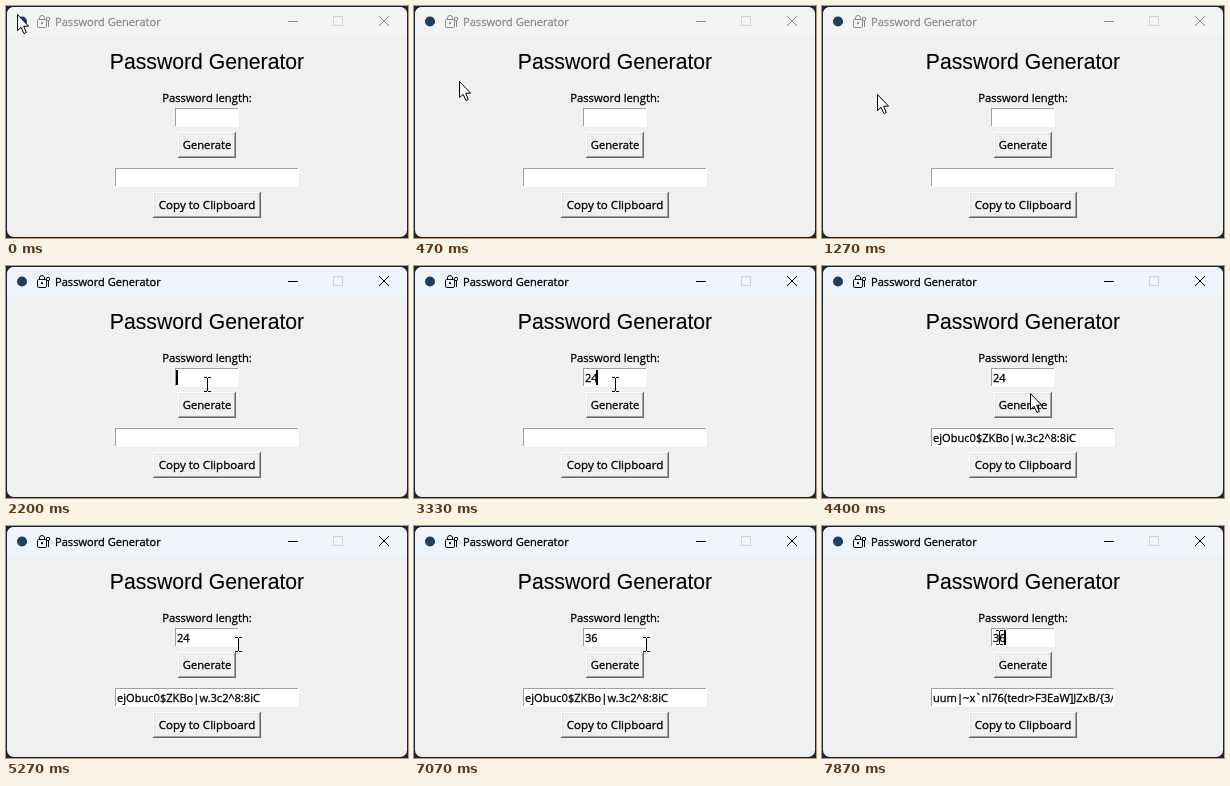
An HTML page with a canvas that plays this animation: 402x232 px, repeating every 8 s.

```html
<!DOCTYPE html>
<html lang="en">
<head>
<meta charset="utf-8">
<title>Password Generator</title>
<style>
  html, body { margin: 0; width: 100%; height: 100%; overflow: hidden; background: #141821; }
  canvas { display: block; }
</style>
</head>
<body>
<canvas id="stage" width="402" height="232"></canvas>
<script>
const ctx = document.getElementById('stage').getContext('2d');
const FPS = 15, STEPS = 120;
const UI = '"Open Sans", "Noto Sans", sans-serif';
const ARIAL = '"Liberation Sans", Arial, sans-serif';

// Pointer moves: first step, last step, destination
const MOVES = [
  { from: 1, to: 9, x: 51, y: 87 },      // into the window
  { from: 18, to: 29, x: 206, y: 113 },  // to the length field
  { from: 31, to: 33, x: 201, y: 118 },
  { from: 50, to: 58, x: 238, y: 138 },  // past the button
  { from: 58, to: 62, x: 208, y: 127 },  // onto the button
  { from: 72, to: 77, x: 232, y: 118 },  // back to the field
  { from: 109, to: 111, x: 212, y: 135 },
  { from: 116, to: 118, x: 177, y: 111 }
];
const FOCUS = 29;
const CLICKS = [64, 114];
const PASSWORDS = ['ejObuc0$ZKBo|w.3c2^8:8iC', 'uum|~x`nl76(tedr>F3EaW]JZxB/{3/'];
const KEYS = [[46, '2'], [50, '4'], [86, '<'], [88, '<'], [90, '3'], [94, '6']]; // '<' deletes

const ramp = (n, from, to) => Math.min(1, Math.max(0, (n - from) / (to - from)));
const ease = k => k * k * (3 - 2 * k);

function pointerAt(n) {
  let x = 11, y = 8;
  for (const m of MOVES) {
    const k = ease(ramp(n, m.from, m.to));
    x += (m.x - x) * k;
    y += (m.y - y) * k;
  }
  return [Math.round(x), Math.round(y)];
}

function typed(n) {
  let value = '';
  for (const [step, key] of KEYS) {
    if (step <= n) value = key === '<' ? value.slice(0, -1) : value + key;
  }
  return value;
}

// 600 ms on, 300 ms off
const caretOn = n => n >= FOCUS && (n - FOCUS - .5) % 13.5 < 9;

const mix = (a, b, k) => `rgb(${a.map((v, i) => Math.round(v + (b[i] - v) * k))})`;

function rect(x, y, w, h, color) {
  ctx.fillStyle = color;
  ctx.fillRect(x, y, w, h);
}

function text(str, x, y, size, { color = '#000', font = UI, align = 'left', weight = .3 } = {}) {
  ctx.font = `${size}px ${font}`;
  ctx.textAlign = align;
  ctx.fillStyle = ctx.strokeStyle = color;
  ctx.lineWidth = weight;
  ctx.fillText(str, x, y);
  ctx.strokeText(str, x, y);
}

function line(...points) {
  ctx.beginPath();
  ctx.moveTo(...points[0]);
  for (const p of points.slice(1)) ctx.lineTo(...p);
  ctx.stroke();
}

function circle(x, y, r) {
  ctx.beginPath();
  ctx.arc(x, y, r, 0, 7);
}

function edge(x, y, w, h, topLeft, bottomRight) {
  rect(x, y, w, h, bottomRight);
  rect(x, y, w - 1, h - 1, topLeft);
}

function button(label, x, y, w, size, down) {
  const h = 26, shift = down ? 1 : 0;
  const [a, b, c, d] = down
    ? ['#696969', '#fff', '#a0a0a0', '#e3e3e3']
    : ['#fff', '#696969', '#e3e3e3', '#a0a0a0'];
  edge(x, y, w, h, a, b);
  edge(x + 1, y + 1, w - 2, h - 2, c, d);
  rect(x + 2, y + 2, w - 4, h - 4, '#f0f0f0');
  text(label, x + w / 2 + shift, y + 17 + shift, size, { align: 'center' });
}

function entry(value, x, y, w) {
  edge(x, y, w, 19, '#a0a0a0', '#fff');
  rect(x + 1, y + 1, w - 2, 17, '#fff');
  ctx.save();
  ctx.beginPath();
  ctx.rect(x + 2, y + 2, w - 4, 15);
  ctx.clip();
  text(value, x + 2, y + 14, 11.1);
  ctx.restore();
}

function lockIcon(color) {
  ctx.strokeStyle = ctx.fillStyle = color;
  ctx.lineWidth = 1;
  ctx.beginPath();
  ctx.roundRect(31.5, 13.5, 9, 8, 1.2);
  ctx.moveTo(33.5, 13.5);
  ctx.arc(36, 12, 2.5, Math.PI, 0);
  ctx.lineTo(38.5, 13.5);
  ctx.stroke();
  circle(36, 17.2, 1.1);
  ctx.fill();
  circle(42, 13, 1.7);
  ctx.stroke();
  line([42.5, 15], [42.5, 21]);
}

function titleBar(active) {
  rect(1, 1, 400, 30, mix([243, 243, 243], [239, 244, 250], active));
  ctx.fillStyle = '#1f3d5c';
  circle(16, 15.5, 5);
  ctx.fill();

  const ink = mix([140, 140, 140], [0, 0, 0], active);
  lockIcon(ink);
  text('Password Generator', 49, 20, 11.1, { color: ink });

  rect(282, 15, 10, 1, ink);
  ctx.lineWidth = 1;
  ctx.strokeStyle = '#d0d2d5';
  ctx.strokeRect(327.5, 10.5, 9, 9);
  ctx.strokeStyle = ink;
  line([373, 10], [383, 20]);
  line([383, 10], [373, 20]);
}

function arrow(x, y) {
  const shape = [[0, 0], [0, 16], [3.6, 12.8], [6.4, 19], [8.8, 18], [6.2, 11.8], [11, 11.6]];
  ctx.beginPath();
  for (const [dx, dy] of shape) ctx.lineTo(x + dx + .5, y + dy + .5);
  ctx.closePath();
  ctx.fillStyle = '#fff';
  ctx.fill();
  ctx.strokeStyle = '#000';
  ctx.lineWidth = 1;
  ctx.stroke();
}

function beam(x, y) {
  rect(x, y - 6, 1, 13, '#000');
  for (const dy of [-7, 7]) {
    rect(x - 3, y + dy, 3, 1, '#000');
    rect(x + 1, y + dy, 3, 1, '#000');
  }
}

function draw(n) {
  const [x, y] = pointerAt(n);
  const value = typed(n);
  const made = CLICKS.filter(step => step < n).length;

  rect(0, 0, 402, 232, '#1e2431');
  ctx.save();
  ctx.beginPath();
  ctx.roundRect(1, 1, 400, 230, 7);
  ctx.clip();
  rect(1, 1, 400, 230, '#f0f0f0');
  titleBar(ramp(n, FOCUS, FOCUS + 4));
  ctx.restore();

  text('Password Generator', 201, 63, 21.2, { font: ARIAL, align: 'center', weight: .1 });
  text('Password length:', 201, 96, 11.25, { align: 'center' });
  entry(value, 169, 102, 64);
  if (caretOn(n)) rect(170 + 6 * value.length, 104, 2, 15, '#000');
  button('Generate', 172, 126, 58, 11.2, CLICKS.includes(n));
  entry(made ? PASSWORDS[made - 1] : '', 109, 162, 184);
  button('Copy to Clipboard', 147, 186, 108, 11.6, false);

  const overEntry = x >= 169 && x < 233 && y >= 102 && y < 121;
  (overEntry ? beam : arrow)(x, y);
}

function tick() {
  // The small offset keeps each step on its rounded start time
  draw(Math.floor(performance.now() * FPS / 1000 + .1) % STEPS);
  requestAnimationFrame(tick);
}
tick();
</script>
</body>
</html>
```
